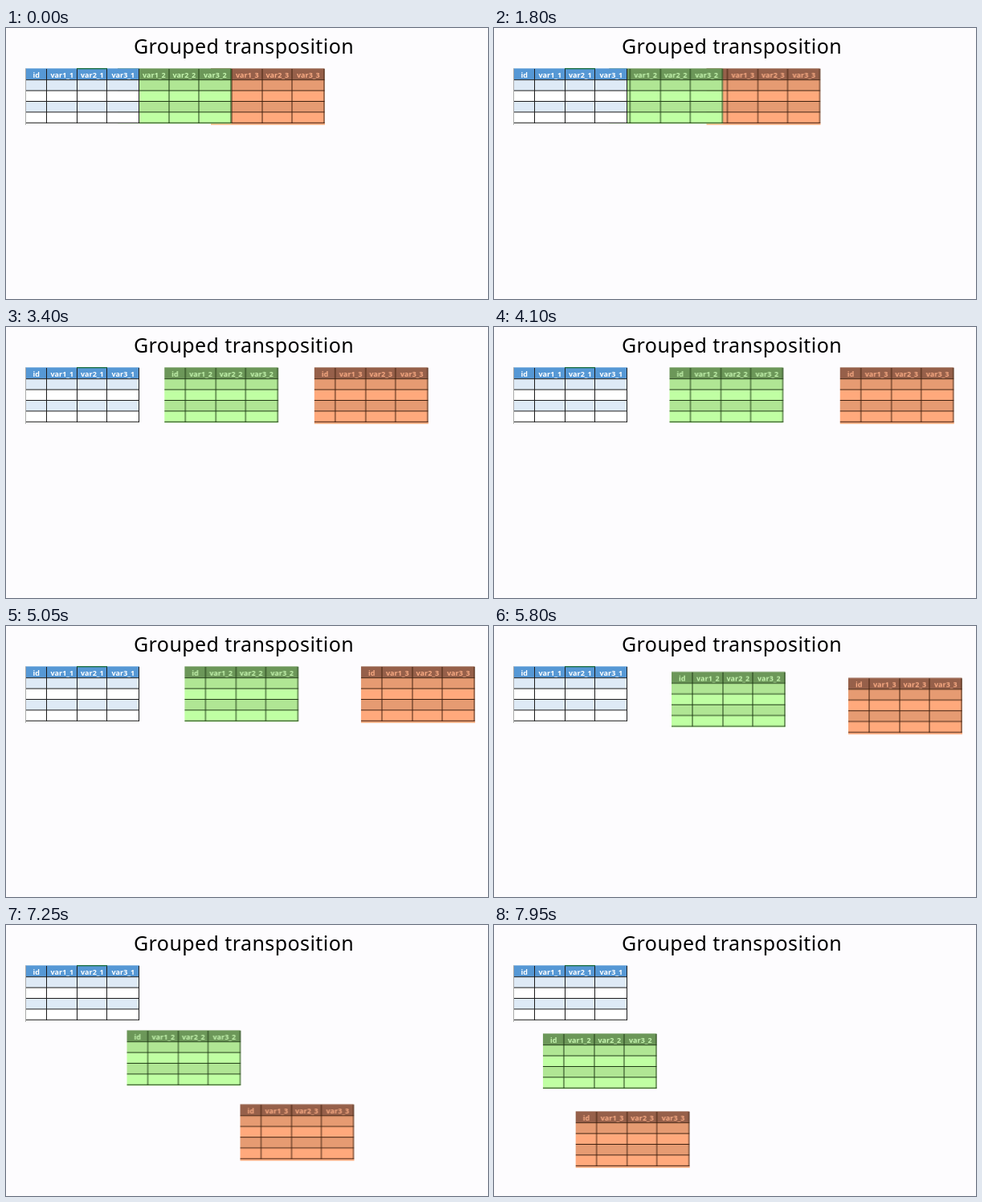
Animation, 600 px wide and 338 px high, one loop 8 s. Source, as an HTML page:

```html
<!DOCTYPE html>
<html lang="en">
<head>
<meta charset="utf-8">
<title>Grouped transposition</title>
<style>
html, body { margin: 0; width: 100%; height: 100%; overflow: hidden; background: #fdfcfe; }
svg { display: block; width: 600px; height: 338px; }
.title { font: 25px "Noto Sans", sans-serif; letter-spacing: .42px; }
.head { font: bold 9px "Open Sans", sans-serif; text-anchor: middle; }
.blue { transform: translate(24.5px, 51px); }
.green { --x0: 139px; --x1: 224px; --x2: 221px; --x3: 57.5px; --drop: 136px; }
.orange { --x0: 255px; --x1: 443px; --x2: 441px; --x3: 94.4px; --drop: 233px; }
.slide { animation: slide 8s infinite; }
.fall { animation: fall 8s infinite; }
@keyframes slide {
  0% { transform: translateX(var(--x0)); }
  16% { transform: translateX(var(--x0)); animation-timing-function: cubic-bezier(.4, 0, .636, 1); }
  58.08% { transform: translateX(var(--x1)); animation-timing-function: cubic-bezier(.364, 0, .636, 1); }
  67.5% { transform: translateX(var(--x2)); }
  80.6% { transform: translateX(var(--x2)); animation-timing-function: cubic-bezier(.364, 0, .67, .8); }
  100% { transform: translateX(var(--x3)); }
}
@keyframes fall {
  0% { transform: translateY(51px); }
  67.7% { transform: translateY(51px); animation-timing-function: cubic-bezier(.364, 0, .636, 1); }
  94.4%, 100% { transform: translateY(var(--drop)); }
}
</style>
</head>
<body>
<svg viewBox="0 0 600 338">
  <text class="title" x="159" y="32">Grouped transposition</text>
  <g class="orange slide"><g class="fall" id="t3"></g></g>
  <g class="green slide"><g class="fall" id="t2"></g></g>
  <g class="blue" id="t1"></g>
</svg>
<script>
const cols = [0, 26, 64, 101, 141];
const lines = [0, 1, 2, 3, 4].map(i => 13.7 + 13.4 * i);
const edges = [-.6, ...lines.slice(0, 4), 68.5];

const rect = (x, y, w, h, fill) =>
  `<rect x="${x}" y="${y}" width="${w}" height="${h}" fill="${fill}"/>`;

function table(n, { head, text, odd, even, line, under = '', over = '' }) {
  const fills = [head, odd, even, odd, even];
  const bands = fills.map((f, i) => rect(0, edges[i], 141.5, edges[i + 1] - edges[i], f)).join('');
  const grid = lines.map(y => `M0 ${y}H141.5`).join('') +
    cols.slice(1).map(x => `M${x} 0V67.8`).join('');
  const labels = ['id', 1, 2, 3].map((v, i) => {
    const mid = (cols[i] + cols[i + 1]) / 2 + .3;
    return `<text class="head" x="${mid}" y="10.9" fill="${text}">${i ? `var${v}_${n}` : v}</text>`;
  }).join('');
  document.getElementById('t' + n).innerHTML = under + bands +
    `<path d="${grid}" fill="none" stroke="${line}"/>` + labels + over;
}

table(1, {
  head: '#5698d5', text: '#fff', odd: '#deeaf6', even: '#fff', line: '#1c1c1c',
  over: rect(-.5, -.6, 1, 70.4, '#aaa') + rect(63.5, -1, 38, 1.4, '#217346')
});
table(2, { head: '#6c9759', text: '#c6f6b0', odd: '#b0e694', even: '#c0ffa3', line: '#1f3b14' });
table(3, {
  head: '#96604a', text: '#f9ab84', odd: '#e69b72', even: '#ffa97c', line: '#40200f',
  under: rect(0, 67, 142, 3, '#ffb78f')
});
</script>
</body>
</html>
```
